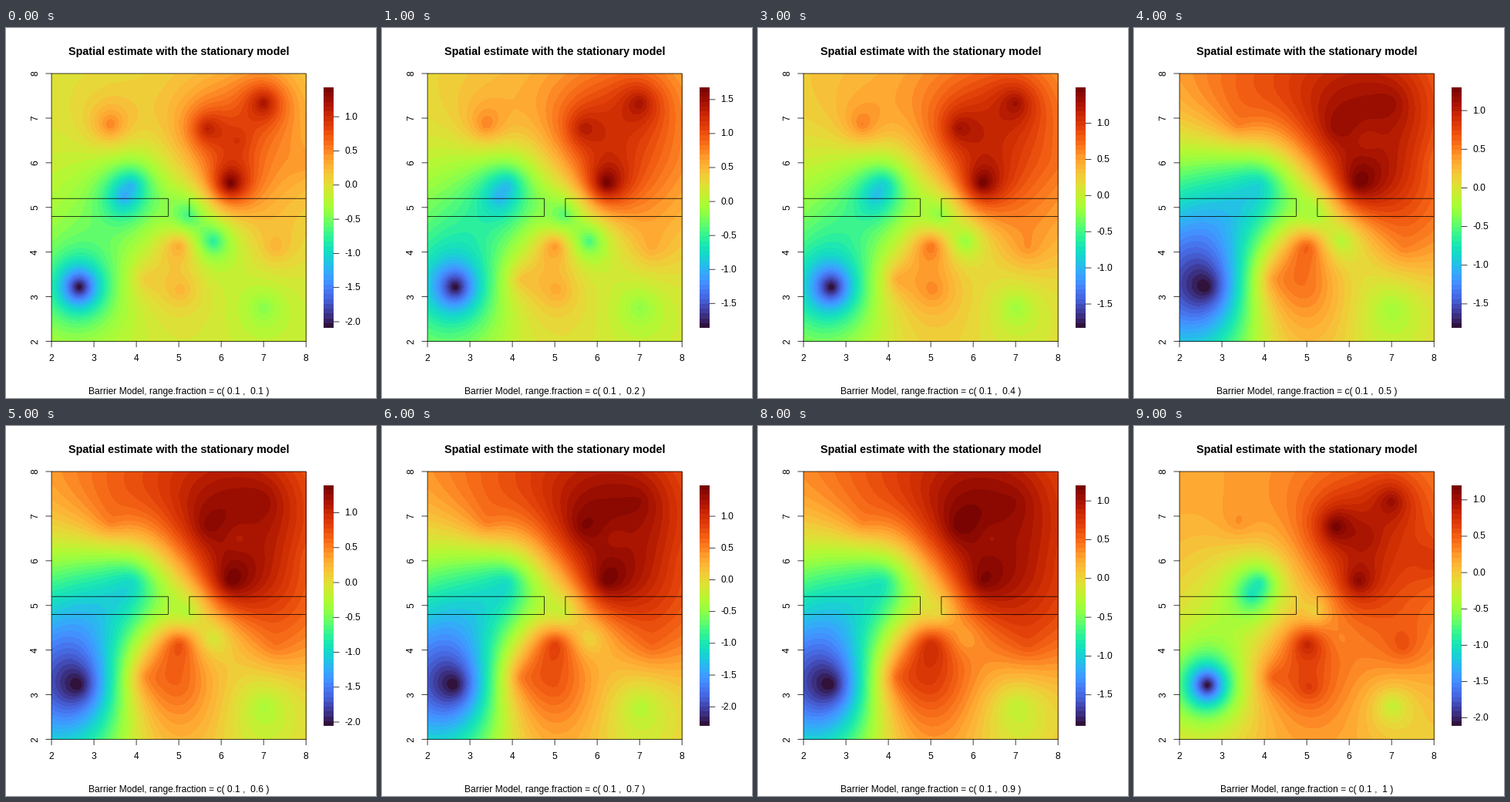
A matplotlib script that plays this animation: 480 px wide and 480 px high, repeating every 10000 ms.

```python
import math

import numpy as np
import matplotlib.pyplot as plt
from matplotlib.animation import FuncAnimation
from matplotlib.patches import Rectangle

SIZE, DPI, FRAMES = 480, 100, 10
LEFT, RIGHT, TOP, BOTTOM = 59.04, 389.2, 59.04, 406.56
BAR_L, BAR_R, BAR_T, BAR_B = 412, 425, 77, 389
LEVELS = 50
LW = 0.54

# Scale limits and share of the short-range kernel at some range fractions
KEYS = [1, 2, 4, 5, 7, 9, 10]
LOW = [-2.09, -1.86, -1.83, -1.81, -2.30, -1.90, -2.11]
HIGH = [1.43, 1.68, 1.495, 1.30, 1.486, 1.20, 1.20]
SHORT = [0.7, 0.5, 0.5, 0.1, 0.12, 0.1, 0.65]

# Observations: x, y, value at the start and at the end of the loop
SITES = np.array([
    (2.65, 3.22, -2.05, -2.05), (3.68, 5.22, -1.2, -0.95),
    (3.9, 5.52, -1.1, -0.9), (3.38, 6.85, 0.65, 0.3),
    (5.65, 6.77, 1.25, 1.2), (7, 7.35, 1.35, 1.05),
    (6.2, 5.53, 1.6, 1.1), (5, 4.15, 0.45, 0.85),
    (5.8, 4.25, -0.7, 0.35), (7.27, 4.1, 0.4, 0.6),
    (7, 2.75, -0.35, -0.28), (5.05, 3.15, 0.4, 0.7),
    (4.2, 3.4, 0.25, 0.5), (5.2, 4.85, -0.6, 0),
    (6.4, 6.5, 1.1, 1.0), (8, 6, 0.55, 0.75), (8, 2, 0, 0),
])
XY = SITES[:, :2]


def px(x):
    return LEFT + (x - 2) * (RIGHT - LEFT) / 6


def py(y):
    return BOTTOM - (y - 2) * (BOTTOM - TOP) / 6


def dist(a, b):
    return np.hypot(a[:, None, 0] - b[:, 0], a[:, None, 1] - b[:, 1])


def kernel(r, short):
    """Mix of a pointed short-range and a smooth long-range correlation."""
    near = np.exp(-(r / 0.45) ** 1.3)
    far = np.exp(-(r / (2.4 - 1.2 * short)) ** 1.55)
    return short * near + (1 - short) * far


cols, rows = 330, 347
grid = np.stack(np.meshgrid(np.linspace(2, 8, cols), np.linspace(8, 2, rows)), -1)
site_r, grid_r = dist(XY, XY), dist(grid.reshape(-1, 2), XY)


def surface(i):
    """Kriged estimate of frame i, scaled to 0..1."""
    u = i / (FRAMES - 1)
    mean = 0.05 + 0.15 * u
    obs = (1 - u) * SITES[:, 2] + u * SITES[:, 3] - mean
    short = np.interp(i + 1, KEYS, SHORT)
    z = kernel(grid_r, short) @ np.linalg.solve(kernel(site_r, short), obs)
    return ((z - z.min()) / np.ptp(z)).reshape(rows, cols)


fields = [surface(i) for i in range(FRAMES)]

fig = plt.figure(figsize=(SIZE / DPI, SIZE / DPI), dpi=DPI, facecolor="white")
ax = fig.add_axes([0, 0, 1, 1])
ax.axis("off")
cmap = plt.get_cmap("turbo", LEVELS)


def text(x, y, s, size=12, **kw):
    kw = {"ha": "center", "va": "center", **kw}
    return ax.text(x, y, s, fontsize=size * 72 / DPI,
                   family="Liberation Sans", color="black", **kw)


def line(xs, ys):
    return ax.plot(xs, ys, color="black", lw=LW, snap=False)[0]


def frame(x0, y0, x1, y1):
    return ax.add_patch(Rectangle((x0, y0), x1 - x0, y1 - y0, fill=False,
                                  ec="black", lw=LW, snap=False))


def picture(data, l, r, t, b):
    return ax.imshow(data, extent=(l, r, b, t), cmap=cmap, vmin=0, vmax=1,
                     interpolation="nearest", aspect="auto")


field = picture(fields[0], LEFT, RIGHT, TOP, BOTTOM)
ramp = (np.arange(LEVELS)[::-1, None] + 0.5) / LEVELS
picture(ramp, BAR_L, BAR_R, BAR_T, BAR_B)

frame(LEFT, TOP, RIGHT, BOTTOM)
area = Rectangle((LEFT, TOP), RIGHT - LEFT, BOTTOM - TOP, transform=ax.transData)
for x0, x1 in ((1, 4.75), (5.25, 9)):
    frame(px(x0), py(5.2), px(x1), py(4.8)).set_clip_path(area)

for v in range(2, 9):
    line([px(v)] * 2, [BOTTOM, BOTTOM + 7.2])
    line([LEFT - 7.2, LEFT], [py(v)] * 2)
    text(px(v), 429.5, str(v))
    text(38, py(v), str(v), rotation=90)

text(224, 30.7, "Spatial estimate with the stationary model", 14.4, weight="bold")
caption = text(224, 472, "")
ticks = [(line([BAR_R, BAR_R + 7], [0, 0]), text(439.5, 0, "", ha="left"))
         for _ in range(8)]
ax.set_xlim(0, SIZE)
ax.set_ylim(SIZE, 0)


def draw(i):
    tenth = i + 1
    field.set_data(fields[i])
    caption.set_text(f"Barrier Model, range.fraction = c( 0.1 ,  {tenth / 10:g} )")
    lo, hi = np.interp(tenth, KEYS, LOW), np.interp(tenth, KEYS, HIGH)
    first = math.ceil(lo * 2)
    for k, (mark, label) in enumerate(ticks):
        v = (first + k) / 2
        y = BAR_B - (v - lo) / (hi - lo) * (BAR_B - BAR_T)
        mark.set_ydata([y, y])
        label.set_y(y + 0.5)
        label.set_text(f"{v:.1f}")
        mark.set_visible(v <= hi)
        label.set_visible(v <= hi)
    return []


anim = FuncAnimation(fig, draw, frames=FRAMES, interval=1000, repeat=True,
                     repeat_delay=0, blit=False)
plt.show()
```
